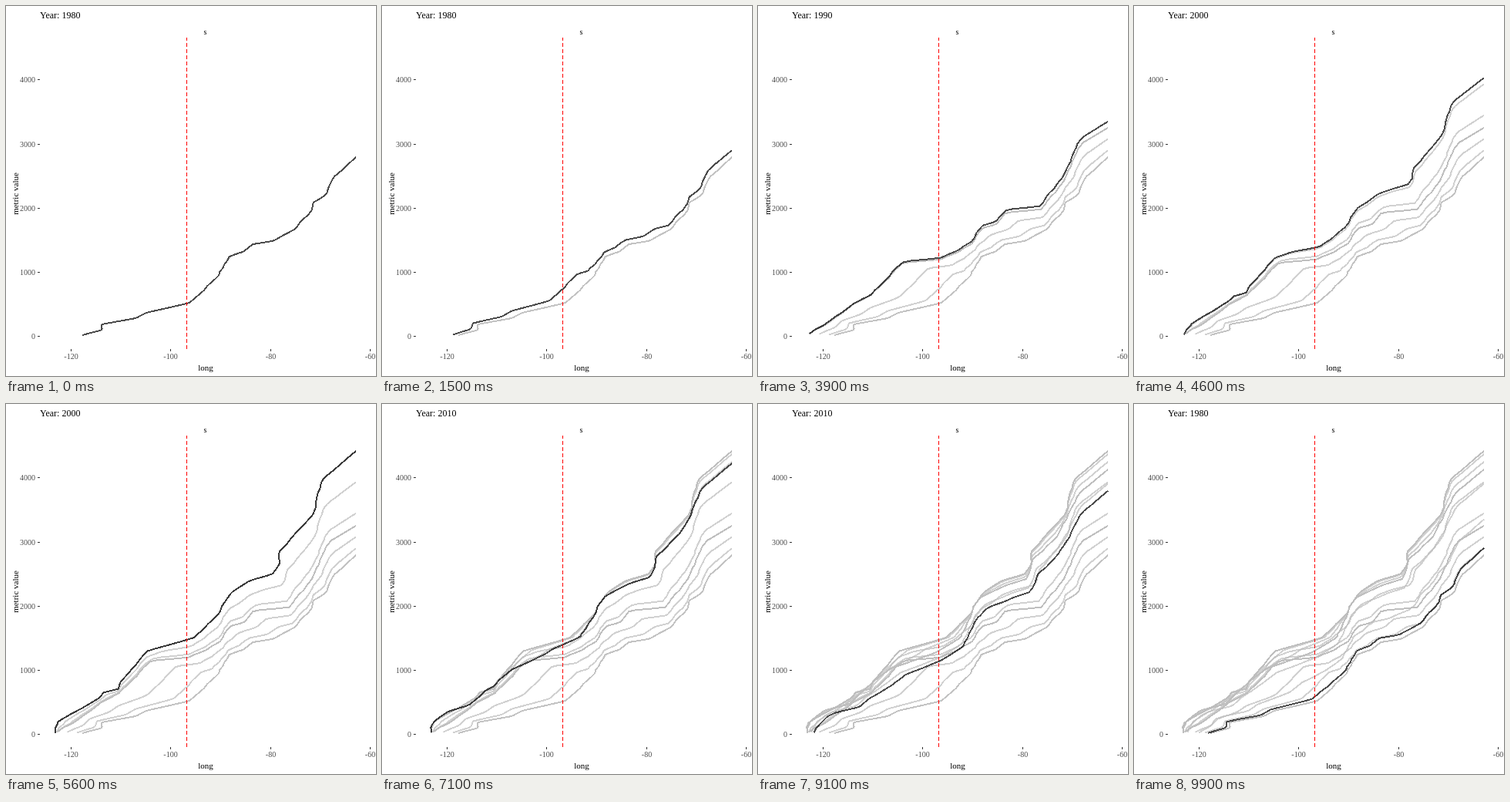
An HTML page that plays this animation: 480x480 px, repeating every 10000 ms.

```html
<!DOCTYPE html>
<html lang="en">
<head>
<meta charset="utf-8">
<style>
  html, body { margin: 0; width: 100%; height: 100%; overflow: hidden; background: #fff; }
  svg { display: block; width: 480px; height: 480px; font: 10px "Liberation Serif", "Times New Roman", serif; }
  path { fill: none; shape-rendering: crispEdges; }
  .axis path { stroke: #333; }
  .axis text { fill: #4d4d4d; }
  .curve { stroke: #000; stroke-width: 2; stroke-opacity: .7; }
  .trail { stroke: #bebebe; }
  .limit { stroke: #f00; stroke-dasharray: 5 3; }
  .middle { text-anchor: middle; }
  .end { text-anchor: end; }
</style>
</head>
<body>
<svg id="stage" viewBox="0 0 480 480">
  <text id="title" x="44" y="16" font-size="12"></text>
  <text class="middle" x="258.5" y="37">s</text>
  <text class="middle" x="259" y="473" font-size="11">long</text>
  <text class="middle" transform="translate(16 243.5) rotate(-90)" font-size="11">metric value</text>
</svg>
<script>
const FRAMES = 100, FRAME_MS = 100, TRAIL_STEP = 5, SAMPLES = 144, KNOTS = 48;
const stage = document.getElementById('stage'), title = document.getElementById('title');

// Key points of each year's curve as x,y; bend relates height along the curve to point order.
// A curve rests until frame `leave`, then moves linearly to the next year by `arrive`.
const states = [
  { year: 1980, bend: 0.95, leave: 12, arrive: 25, points: [
    99,427, 123,421, 125,413, 168,405, 182,398, 238,385, 256,369, 276,349, 289,325,
    308,319, 319,309, 346,305, 373,290, 398,264, 399,255, 414,246, 422,226, 454,196] },
  { year: 1990, bend: 1, leave: 38, arrive: 50, points: [
    67,425, 96,408, 124,387, 146,375, 169,353, 187,333, 236,329, 258,320, 277,308,
    291,288, 309,283, 321,268, 366,264, 397,228, 411,193, 422,177, 454,158] },
  { year: 2000, bend: 0.924, leave: 63, arrive: 75, points: [
    64,427, 66,413, 122,381, 126,374, 145,370, 148,361, 184,320, 245,303, 276,271,
    291,245, 316,229, 345,221, 354,207, 355,191, 399,143, 404,115, 413,96, 454,61] },
  { year: 2010, bend: 1, leave: 88, arrive: 100, points: [
    64,426, 65,413, 88,397, 119,389, 148,361, 172,343, 230,323, 264,302, 280,263,
    289,250, 322,235, 348,227, 357,201, 388,173, 408,131, 420,113, 454,85] }
];

const mix = (a, b, t) => a + (b - a) * t;

let seed = 7;
const random = () => (seed = seed * 16807 % 2147483647) / 2147483647;

// Small sideways steps that give the curves their uneven, cumulative look.
const steps = Array.from({ length: KNOTS + 2 }, (_, i) => i % KNOTS ? random() * 2.4 - 1.2 : 0);
function wobble(u) {
  const k = Math.floor(u * KNOTS);
  return mix(steps[k], steps[k + 1], u * KNOTS - k);
}

function resample({ points: p, bend }) {
  const curve = [];
  for (let i = 0, k = 0; i <= SAMPLES; i++) {
    const u = i / SAMPLES, y = mix(p[1], p.at(-1), u ** (1 / bend));
    while (k < p.length - 4 && p[k + 3] > y) k += 2;
    const t = (p[k + 1] - y) / (p[k + 1] - p[k + 3]);
    curve.push([mix(p[k], p[k + 2], t) + wobble(u), y]);
  }
  return curve;
}
states.forEach(s => s.curve = resample(s));

function poseAt(frame) {
  const i = states.findIndex(s => frame < s.arrive);
  const from = states[i], to = states[(i + 1) % states.length];
  const t = Math.max(0, (frame - from.leave) / (from.arrive - from.leave));
  const points = from.curve.map(([x, y], k) =>
    mix(x, to.curve[k][0], t).toFixed(2) + ',' + mix(y, to.curve[k][1], t).toFixed(2));
  return { d: 'M' + points.join('L'), year: (t < 0.5 ? from : to).year };
}

function add(parent, name, attributes, content = '') {
  const node = document.createElementNS('http://www.w3.org/2000/svg', name);
  for (const key in attributes) node.setAttribute(key, attributes[key]);
  node.textContent = content;
  return parent.appendChild(node);
}

const axis = add(stage, 'g', { class: 'axis' });
for (let i = 0; i < 5; i++) {
  const y = Math.round(428.4 - i * 83.25);
  add(axis, 'text', { class: 'end', x: 38, y: y + 4 }, i * 1000);
  add(axis, 'path', { d: `M41 ${y + 0.5}h3` });
}
for (let i = 0; i < 4; i++) {
  const x = Math.round(83.7 + i * 129.4) + 0.5;
  add(axis, 'text', { class: 'middle', x, y: 458 }, i * 20 - 120);
  add(axis, 'path', { d: `M${x} 445v3` });
}

const trails = [];
for (let frame = TRAIL_STEP; frame < FRAMES; frame += TRAIL_STEP) {
  trails.push({ frame, node: add(stage, 'path', { class: 'curve trail', d: poseAt(frame).d }) });
}
const current = add(stage, 'path', { class: 'curve' });
add(stage, 'path', { class: 'limit', d: 'M234.5 445V41' });

function draw(frame) {
  const pose = poseAt(frame);
  title.textContent = 'Year: ' + pose.year;
  current.setAttribute('d', pose.d);
  for (const trail of trails) {
    trail.node.style.display = trail.frame < frame ? '' : 'none';
  }
}

let shown = -1;
const start = performance.now();
function tick() {
  const frame = Math.floor((performance.now() - start) / FRAME_MS) % FRAMES;
  if (frame !== shown) draw(shown = frame);
  requestAnimationFrame(tick);
}
tick();
</script>
</body>
</html>
```
